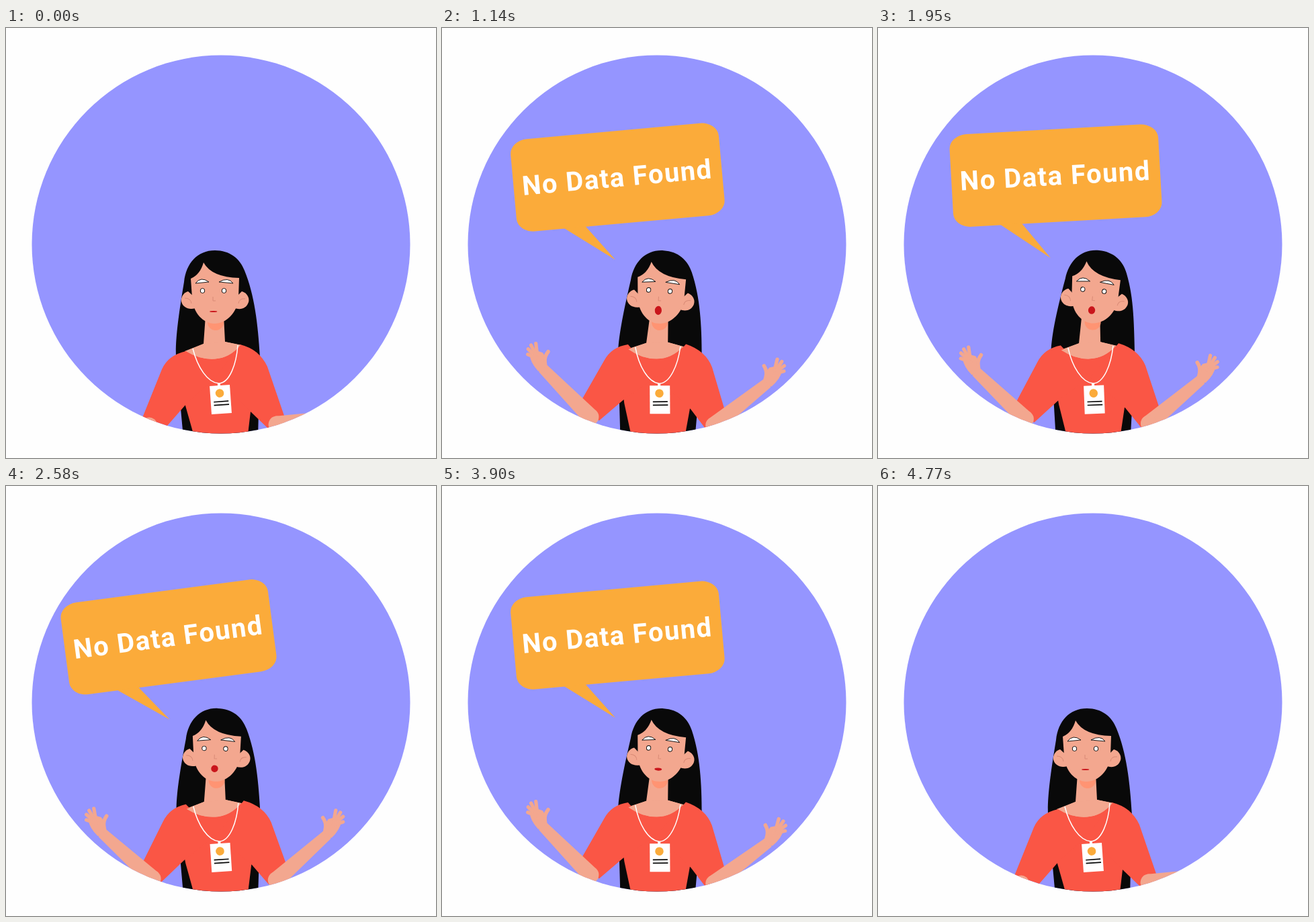
These frames come from a looping animation (640x640 px, 4.83 s). An HTML page with a canvas:

```html
<!DOCTYPE html>
<html lang="en">
<head>
<meta charset="utf-8">
<title>No Data Found</title>
<style>
  html, body { margin: 0; width: 100%; height: 100%; overflow: hidden; background: #fefefe; }
  canvas { display: block; width: 640px; height: 640px; }
</style>
</head>
<body>
<canvas id="stage" width="640" height="640"></canvas>
<script>
const ctx = document.getElementById('stage').getContext('2d');
const LOOP = 4830, STEP = 30, SWAY_PERIOD = 2760;
const SKIN = '#f3a78f', SHIRT = '#fa5645', HAIR = '#090909', ORANGE = '#fbab3a',
      CREASE = '#d98a76', WHITE = '#ffffff';
const HIP = [318, 630], NECK = [318, 462];

const rad = deg => deg * Math.PI / 180;
const lerp = (a, b, u) => a + (b - a) * u;
const ease = (from, to, t) => {
  const u = Math.min(1, Math.max(0, (t - from) / (to - from)));
  return u * u * (3 - 2 * u);
};

// Smooth curve through [time, value] keys, flat at its turning points.
function keyed(keys, t) {
  const last = keys.length - 1;
  if (t <= keys[0][0]) return keys[0][1];
  if (t >= keys[last][0]) return keys[last][1];
  const slope = i => (keys[i + 1][1] - keys[i][1]) / (keys[i + 1][0] - keys[i][0]);
  const tangent = i => {
    if (i === 0 || i === last) return 0;
    const a = slope(i - 1), b = slope(i);
    return a * b <= 0 ? 0 : 2 * a * b / (a + b);
  };
  let i = 0;
  while (keys[i + 1][0] < t) i++;
  const [t0, v0] = keys[i], [t1, v1] = keys[i + 1];
  const d = t1 - t0, u = (t - t0) / d, w = 1 - u;
  return v0 * (1 + 2 * u) * w * w + v1 * u * u * (3 - 2 * u)
       + d * u * w * (tangent(i) * w - tangent(i + 1) * u);
}

const LEAN = [[0, 0], [570, .17], [1140, 1], [1260, 1.04], [1950, .5], [2580, .08], [2760, 0]];
const NOD = [[0, 0], [570, -2.75], [730, -3.3], [1140, 0], [1850, 3.9], [1950, 3.8], [2200, 2], [2580, 1], [2760, 0]];
const MOUTH = [[880, 0], [1140, 1], [1950, .85], [2580, .75], [3330, .6], [3900, .2], [4000, 0]];
const POP = [[660, 0], [900, 1.12], [1100, 1], [3950, 1], [4550, 0]];

function fill(path, color) {
  ctx.fillStyle = color;
  ctx.fill(new Path2D(path));
}

function stroke(path, color, width) {
  ctx.strokeStyle = color;
  ctx.lineWidth = width;
  ctx.stroke(new Path2D(path));
}

function ellipse(x, y, rx, ry, color) {
  ctx.beginPath();
  ctx.ellipse(x, y, rx, ry, 0, 0, 7);
  ctx.fillStyle = color;
  ctx.fill();
}

function group(draw) {
  ctx.save();
  draw();
  ctx.restore();
}

function rotateAt([x, y], deg) {
  ctx.translate(x, y);
  ctx.rotate(rad(deg));
  ctx.translate(-x, -y);
}

// The crown follows the head while the ends follow the body.
function drawBackHair(nod) {
  const c = Math.cos(rad(nod)), s = Math.sin(rad(nod));
  const h = (x, y) => {
    const dx = x - NECK[0], dy = y - NECK[1];
    return `${NECK[0] + dx * c - dy * s} ${NECK[1] + dx * s + dy * c} `;
  };
  fill('M264 610 L253 490 C252 465 ' + h(256, 432) + h(265, 378)
    + 'C' + h(268, 350) + h(285, 331) + h(311, 331)
    + 'C' + h(333, 331) + h(348, 343) + h(355, 361)
    + 'C' + h(370, 398) + '375 440 378 490 L375 610Z', HAIR);
}

function drawTorso() {
  fill('M297 428 L294 470 L266 481 Q285 505 312 498 Q340 495 351 472 L326 467 L324 428Z', SKIN);
  fill('M252 488 Q260 484 268 481 Q289 494 311 492.500 Q333 491 349 472 Q365 476 374 484 '
    + 'L364 571 L358 622 L284 622 L267 562Z', SHIRT);
}

const SLEEVES = {
  left: {
    rest:   [[268, 481], [241, 487], [232, 508], [203, 580], [240, 592], [268, 560]],
    raised: [[267, 474], [243, 479], [233, 500], [203, 561], [231, 590], [265, 557]]
  },
  right: {
    rest:   [[348, 471], [377, 478], [389, 504], [414, 577], [390, 596], [364, 571]],
    raised: [[353, 468], [383, 476], [394, 500], [417, 563], [391, 593], [366, 564]]
  }
};

function drawSleeve({ rest, raised }, u) {
  const p = rest.map(([x, y], i) => `${lerp(x, raised[i][0], u)} ${lerp(y, raised[i][1], u)}`);
  fill(`M${p[0]} Q${p[1]} ${p[2]} L${p[3]} L${p[4]} L${p[5]} L312 520Z`, SHIRT);
}

function drawArm(x, y, side, drop) {
  group(() => {
    ctx.translate(x, y);
    ctx.scale(side, 1);
    ctx.rotate(rad(drop));
    ctx.lineCap = ctx.lineJoin = 'round';
    fill('M-8.500 -9 L69.500 -73 L81 -62 L8.500 9Z', SKIN);
    ellipse(0, 0, 12.4, 12.4, SKIN);
    ellipse(76, -69, 7.5, 7.5, SKIN);
    fill('M69 -71 Q70 -82 77 -91 L88 -94 L96 -87 Q95 -76 82 -63Z', SKIN);
    stroke('M73 -78 Q74 -86 69 -93', SKIN, 5.5);
    for (const tip of ['88 -104', '95 -101', '99 -95', '99 -87'])
      stroke(`M84 -82 L${tip}`, SKIN, 5.2);
  });
}

function drawBadge() {
  stroke('M278 477 C285 505 300 528 317 529 C333 528 343 500 345 472', WHITE, 1.5);
  group(() => {
    ctx.translate(319.5, 553);
    ctx.rotate(rad(-4));
    ctx.fillStyle = WHITE;
    ctx.fillRect(-3, -24, 4, 5);
    ctx.fillRect(-15, -21, 30, 42);
    ellipse(-.8, -9.5, 6.3, 6.3, ORANGE);
    stroke('M-10.500 3 H11.500 M-10.500 8 H12', HAIR, 1.7);
  });
}

function drawHead(open) {
  ellipse(312, 438, 12, 12, '#ff9473');
  fill('M271 392 C264 394 260 401 261 407 C263 416 272 420 282 417 L282 402Z', SKIN);
  fill('M351 392 C358 394 363 401 361 408 C358 417 350 420 340 417 L341 402Z', SKIN);
  stroke('M266 402 Q275 402 276 410 M356 403 Q347 402 346 410', CREASE, 1);
  fill('M275 373 Q289 367 294 349 Q306 371 347 372 L346 401 C345 423 328 440 310 440 '
    + 'C294 440 278 424 277 401Z', SKIN);
  stroke('M308 400 V406 H312', CREASE, 1);
  for (const brow of ['M282 380 Q290 369 302 378Z', 'M317 378 Q331 370 338 380Z']) {
    fill(brow, WHITE);
    stroke(brow, HAIR, .9);
  }
  for (const x of [292.5, 324.5]) {
    ellipse(x, 391, 3.6, 3.8, HAIR);
    ellipse(x, 391, 2.7, 2.9, WHITE);
  }
  ellipse(308.7, lerp(422, 420.5, open), lerp(5.6, 5.1, open), lerp(1, 6.6, open), '#c9151b');
}

function drawBubble(scale) {
  if (scale <= 0) return;
  group(() => {
    ctx.translate(240.2, 349.3);
    ctx.rotate(rad(-8.8));
    ctx.scale(scale, scale);
    ctx.beginPath();
    ctx.roundRect(-141, -191, 311, 138, { x: 26, y: 21 });
    ctx.fillStyle = ORANGE;
    ctx.fill();
    fill('M-72 -54 L0 0 L-40 -54Z', ORANGE);
    ctx.font = 'bold 40px Roboto, sans-serif';
    ctx.letterSpacing = '1.5px';
    ctx.textAlign = 'center';
    ctx.fillStyle = WHITE;
    ctx.fillText('No Data Found', 13.8, -108);
  });
}

function render(t) {
  const settle = 1 - ease(3900, 4770, t);
  const lean = keyed(LEAN, t % SWAY_PERIOD) * settle * 3.6;
  const nod = keyed(NOD, t % SWAY_PERIOD) * settle;
  const left = ease(0, 860, t) * (1 - ease(3960, 4680, t));
  const right = ease(200, 1100, t) * (1 - ease(3840, 4350, t));

  ctx.fillStyle = '#fefefe';
  ctx.fillRect(0, 0, 640, 640);
  group(() => {
    ellipse(320, 322, 281.5, 281.5, '#9595ff');
    ctx.clip();
    rotateAt(HIP, lean);
    drawBackHair(nod);
    drawTorso();
    drawSleeve(SLEEVES.left, left);
    drawSleeve(SLEEVES.right, right);
    // Neckline stays clear of the sleeves' inner corners.
    fill('M294 470 L268 481 Q289 494 311 492.500 Q333 491 349 472 L326 467Z', SKIN);
    drawArm(lerp(213, 218, left), lerp(592, 585, left), -1, 52 * (1 - left));
    drawArm(lerp(403, 402, right), lerp(590, 586, right), 1, 34 * (1 - right));
    drawBadge();
    rotateAt(NECK, nod);
    drawHead(keyed(MOUTH, t));
  });
  group(() => {
    rotateAt(HIP, lean);
    rotateAt(NECK, nod);
    drawBubble(keyed(POP, t));
  });
}

let start;
function tick(now) {
  start ??= now;
  const t = (now - start) % LOOP;
  render(Math.min(LOOP - 2 * STEP, Math.floor(t / STEP) * STEP));
  requestAnimationFrame(tick);
}
render(0);
requestAnimationFrame(tick);
</script>
</body>
</html>
```
